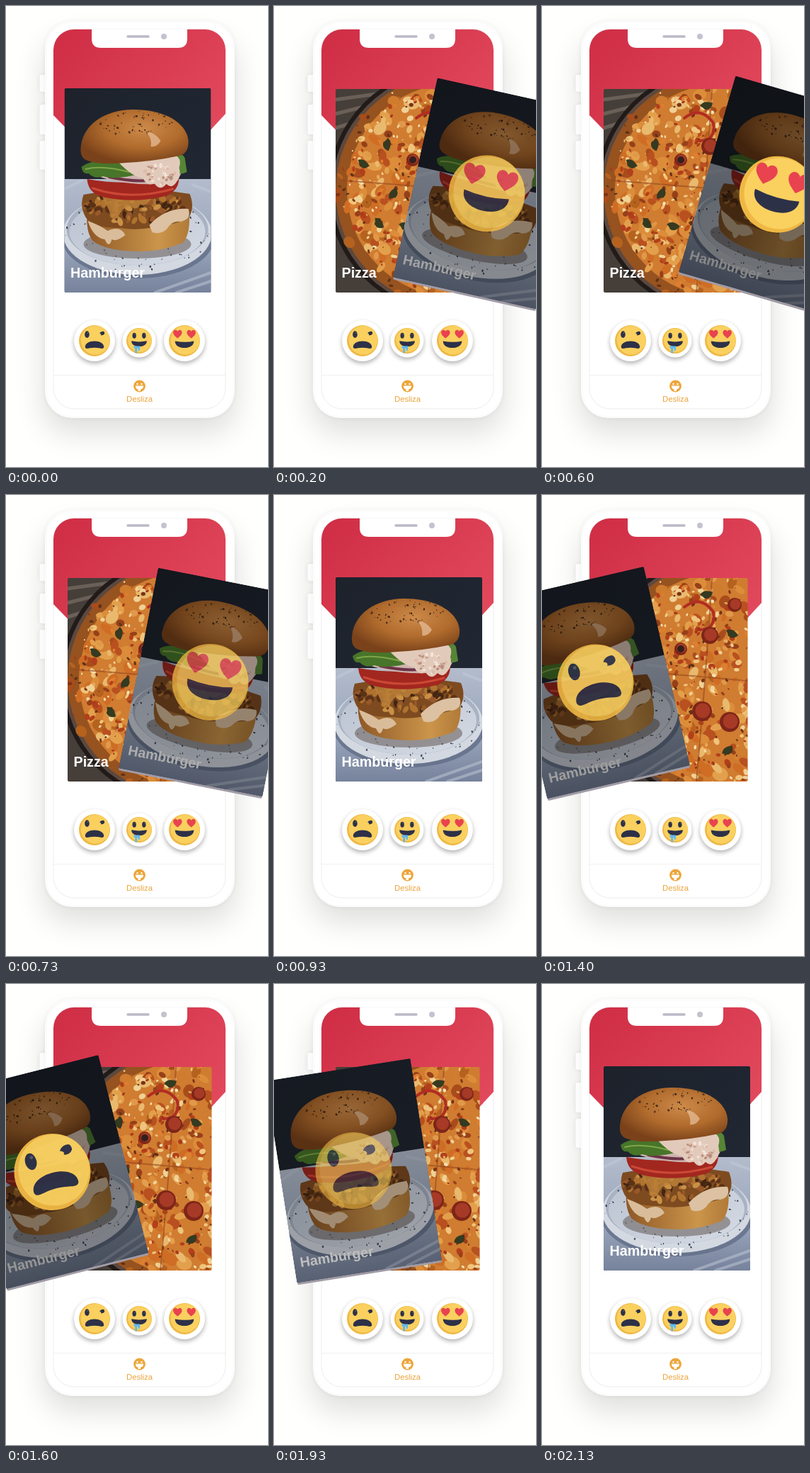
An HTML page for the animation above (3.99 s loop, 370 by 650 pixels).

```html
<!DOCTYPE html>
<html lang="es">
<head>
<meta charset="utf-8">
<title>Desliza</title>
<style>
  html, body { margin: 0; width: 100%; height: 100%; overflow: hidden; background: #fffffd; }
  svg { display: block; width: 370px; height: 650px; }
  text { font-family: "Liberation Sans", Arial, sans-serif; }
  .title { font-size: 19.7px; font-weight: 700; fill: #fff; }
</style>
</head>
<body>
<svg id="stage" viewBox="0 0 370 650" xmlns="http://www.w3.org/2000/svg"></svg>
<script>
const LOOP = 3990;
const CENTER = { x: 190.5, y: 260 };

// [start time, horizontal drag]: swipe right, release, swipe left, release
const DRAG = [
  [0, -4.5], [130, 30], [200, 110], [270, 143], [330, 149],
  [600, 142], [670, 128], [730, 98], [800, 55], [870, 18], [930, 0],
  [1200, -12], [1270, -68], [1400, -115], [1470, -122], [1600, -125],
  [1800, -118], [1870, -103], [1930, -78], [2000, -40], [2070, -14], [2130, 0]
];

const ellipse = (x, y, rx, ry, fill, extra = '') =>
  `<ellipse cx="${x}" cy="${y}" rx="${rx}" ry="${ry}" fill="${fill}" ${extra}/>`;
const circle = (x, y, r, fill, extra) => ellipse(x, y, r, r, fill, extra);
const rect = (x, y, w, h, r, fill, extra = '') =>
  `<rect x="${x}" y="${y}" width="${w}" height="${h}" rx="${r}" fill="${fill}" ${extra}/>`;
const path = (d, fill, extra = '') => `<path d="${d}" fill="${fill}" ${extra}/>`;
const line = (d, color, width, extra = '') =>
  path(d, 'none', `stroke="${color}" stroke-width="${width}" stroke-linecap="round" ${extra}`);
const turn = (deg, x, y) => `transform="rotate(${deg} ${x} ${y})"`;

function random(seed) {
  return () => (seed = (seed * 16807) % 2147483647) / 2147483647;
}

// Small ellipses spread evenly over a disc or an oval
function scatter(seed, count, area, size, colors) {
  const rnd = random(seed);
  let out = '';
  for (let i = 0; i < count; i++) {
    const a = rnd() * Math.PI * 2, d = Math.sqrt(rnd());
    const x = (area.x + area.rx * d * Math.cos(a)).toFixed(1);
    const y = (area.y + area.ry * d * Math.sin(a)).toFixed(1);
    const r = size * (0.5 + rnd());
    const color = colors[Math.floor(rnd() * colors.length)];
    out += ellipse(x, y, r.toFixed(1), (r * (0.45 + rnd() * 0.4)).toFixed(1), color,
      turn(Math.round(rnd() * 180), x, y));
  }
  return out;
}

const defs = `<defs>
  <linearGradient id="red" x1="0" y1=".2" x2="1" y2=".8">
    <stop offset="0" stop-color="#d02f46"/><stop offset="1" stop-color="#e2495d"/></linearGradient>
  <linearGradient id="cloth" x1="0" y1="0" x2="0" y2="1">
    <stop offset="0" stop-color="#b3bccc"/><stop offset=".6" stop-color="#98a4ba"/>
    <stop offset="1" stop-color="#77839c"/></linearGradient>
  <linearGradient id="wall" x1="0" y1="0" x2="1" y2="1">
    <stop offset="0" stop-color="#1d222b"/><stop offset="1" stop-color="#222936"/></linearGradient>
  <linearGradient id="plate" x1="0" y1="0" x2="1" y2="1">
    <stop offset="0" stop-color="#b9c2d0"/><stop offset="1" stop-color="#d6dbe4"/></linearGradient>
  <radialGradient id="bun" cx=".58" cy=".35" r=".65">
    <stop offset="0" stop-color="#cd8a49"/><stop offset=".55" stop-color="#b06b2d"/>
    <stop offset="1" stop-color="#7a421a"/></radialGradient>
  <linearGradient id="base" x1="0" y1="0" x2="1" y2="0">
    <stop offset="0" stop-color="#8f5826"/><stop offset=".7" stop-color="#cb954b"/>
    <stop offset="1" stop-color="#b07a38"/></linearGradient>
  <filter id="soft" x="-40%" y="-40%" width="180%" height="180%"><feGaussianBlur stdDeviation="20"/></filter>
  <filter id="near" x="-40%" y="-40%" width="180%" height="180%"><feGaussianBlur stdDeviation="3.2"/></filter>
  <filter id="photo"><feGaussianBlur stdDeviation=".7"/></filter>
  <clipPath id="screen">${rect(67, 33, 243, 535, 29, '#000')}</clipPath>
  <clipPath id="card">${rect(87, 116, 207, 288, 2, '#000')}</clipPath>
  <clipPath id="below">${rect(87, 117, 203.5, 287, 2, '#000')}</clipPath>
</defs>`;

// Faces are drawn around 0,0 with a radius of 50
const INK = '#2d3148';
const head = circle(0, 0, 50, '#efb844') + circle(2.5, -2, 46.5, '#fad05f');
const heart = x => path('M0 14C-9 7-15 1-14-6C-13-14-3-15 0-8C3-15 13-14 14-6C15 1 9 7 0 14Z',
  '#e8434f', `transform="translate(${x} -22)"`);
const grin = path('M-30 1Q0 7 30 1C31 15 17 23 0 23S-31 15-30 1Z', INK);
const openEye = x => ellipse(x, -20, 7.5, 11, INK) + circle(x + 2, -25, 2.2, '#565b70');

const faces = {
  love: head + heart(-22) + heart(22) + grin,
  drool: head + openEye(-19) + openEye(19) + grin +
    path('M-22 21H3V35Q3 40 0 40T-4 35V31Q-6 28-8 31V44Q-8 50-12 50T-16 44V32Q-22 30-22 21Z', '#5fb9f1'),
  nope: head + openEye(-24) +
    path('M16-24Q20-31 29-30Q33-28 32-22Q28-16 20-18Q23-22 16-24Z', INK) +
    path('M-30 21C-31 8-16 1 0 1S31 8 30 21C27 29 18 22 0 22S-27 29-30 21Z', INK)
};
const face = (name, x, y, r) =>
  `<g transform="translate(${x} ${y}) scale(${r / 50})">${faces[name]}</g>`;
const button = (name, x, r, inner) =>
  circle(x, 475, r, '#000', 'opacity=".3" filter="url(#near)"') +
  circle(x, 472, r, '#fff') + face(name, x, 472, inner);

function phone() {
  const keys = [[97, 24], [139, 42], [190, 41]].map(([y, h]) =>
    rect(47.5, y, 14, h, 3, '#000', 'opacity=".08" filter="url(#near)"') +
    rect(47.5, y, 14, h, 3, '#fdfdfd')).join('');
  return rect(52, 46, 274, 557, 40, '#000', 'opacity=".12" filter="url(#soft)"') + keys +
    rect(55, 22, 268, 559, 38, '#000', 'opacity=".06" filter="url(#near)"') +
    rect(55, 21, 268, 560, 38, '#fcfcfc') +
    rect(58, 24, 262, 554, 35, '#fff') +
    rect(67, 33, 243, 535, 29, '#fff', 'stroke="#ededed"') +
    `<g clip-path="url(#screen)">
      ${path('M67 33H310V152L274 191H103L67 154Z', 'url(#red)')}
      ${path('M121 32V46Q121 59 134 59H243Q256 59 256 46V32Z', '#fff')}
      ${line('M67 520.5H310', '#f0f0f0', 1)}
    </g>` +
    line('M172 43H201', '#bbb9c7', 3.4) + circle(223, 43, 4, '#c4c2cf') +
    button('nope', 125, 29, 22) + button('drool', 188, 23.5, 18) + button('love', 252, 29, 22) +
    circle(188.5, 536, 8.4, '#eda63b') +
    circle(185.5, 533, 1.2, '#fff') + circle(191.5, 533, 1.2, '#fff') +
    path('M183 535.5H194Q194 540 190 540.5V543H186.5V540.5Q183 540 183 535.5Z', '#fff') +
    '<text x="188.5" y="558" font-size="11.3" text-anchor="middle" fill="#eba43c">Desliza</text>';
}

function pizza() {
  const disc = { x: 251, y: 260, rx: 149, ry: 149 };
  const whole = { x: 251, y: 260, rx: 163, ry: 163 };
  const leaf = (x, y, a) => path('M-9 1Q-4-8 9-3Q7 7-2 6Q-4 3-9 1Z', '#353a20',
    `transform="translate(${x} ${y}) rotate(${a})"`);
  const salami = (x, y, r) => circle(x, y, r, '#7d2518') + circle(x + 1, y - 1, r * 0.75, '#a63a26');
  return `<g clip-path="url(#below)"><g filter="url(#photo)">
    ${rect(87, 116, 207, 288, 0, '#453e39')}
    ${line('M87 132L160 122M87 152L135 140M87 172L110 165', '#6b6058', 5)}
    ${circle(251, 260, 175, '#211b19')}
    ${circle(251, 260, 169, '#5b483f')}
    ${circle(251, 260, 164, '#96521f')}
    ${circle(253, 260, 150, '#d07c31')}
    ${scatter(77, 90, whole, 7, ['#b5621f', '#cf7c2f', '#a84c1c'])}
    ${scatter(11, 190, disc, 8, ['#e3a04c', '#e9b96e', '#cf6d25', '#dc8d3a', '#b9501f'])}
    ${scatter(29, 300, disc, 4, ['#f0d195', '#b23f1b', '#e0994a', '#96401a', '#dd7f30', '#efc47c'])}
    ${scatter(83, 300, whole, 2.2, ['#7a3414', '#f5dfb0', '#a8381a', '#e5aa5c', '#5f3218'])}
    ${line('M97 246Q180 252 290 262M240 117Q232 250 218 404', '#95481f', 2, 'opacity=".6"')}
    ${line('M201 158Q224 140 242 165Q246 190 222 190', '#b22c22', 4)}
    ${salami(196, 217, 9)}${circle(196, 217, 5, '#33201d')}
    ${salami(237, 198, 12)}${salami(265, 320, 14)}${salami(226, 305, 14)}${salami(272, 155, 10)}
    ${leaf(232, 140, 0)}${leaf(148, 306, 60)}${leaf(168, 265, -50)}${leaf(262, 360, -25)}
    ${leaf(185, 310, 20)}${leaf(268, 195, 35)}${leaf(160, 195, 100)}${leaf(126, 222, 40)}
    </g><text class="title" x="95.5" y="383">Pizza</text>
  </g>`;
}

function burger() {
  return `<g clip-path="url(#card)">
    ${rect(87, 116, 207, 288, 0, 'url(#wall)')}
    ${rect(87, 244, 207, 160, 0, 'url(#cloth)')}
    ${line('M87 258L112 246M268 252L294 262M215 404L294 376M245 404L294 388', '#c3cbd9', 4, 'opacity=".5"')}
    ${ellipse(191, 328, 107, 56, '#5f6b84', 'opacity=".75"')}
    ${ellipse(190, 321, 105, 58, '#d3d8e1')}
    ${ellipse(190, 315, 100, 51, '#a8b2c3')}
    ${ellipse(190, 318, 96, 48, 'url(#plate)')}
    ${scatter(53, 110, { x: 190, y: 321, rx: 102, ry: 55 }, 1.2, ['#2e3542', '#4c5566'])}
    ${ellipse(190, 336, 76, 20, '#6d6463', 'opacity=".6"')}
    ${path('M119 290Q190 305 263 286Q266 322 254 334Q222 347 190 346Q144 345 127 331Q117 319 119 290Z', 'url(#base)')}
    ${path('M114 266Q190 252 264 265Q271 282 264 296Q248 308 228 308Q196 318 166 313Q130 314 117 298Q108 282 114 266Z', '#7e4b20')}
    ${scatter(41, 110, { x: 188, y: 284, rx: 72, ry: 23 }, 4.5, ['#b0732f', '#5c3216', '#98592a', '#c99046', '#432613'])}
    ${path('M140 268Q186 258 210 271Q203 283 194 280Q188 290 181 282Q168 284 163 297Q156 307 150 288Z', '#bd8139', 'opacity=".85"')}
    ${path('M207 309Q230 284 262 286Q267 300 252 304Q239 302 232 314Q223 323 211 319Z', '#dcc1a2')}
    ${path('M120 303Q137 309 148 317Q166 309 173 323Q160 333 154 329Q150 343 144 329Q128 327 120 303Z', '#d9bd9b')}
    ${path('M119 244Q182 255 249 241Q249 261 230 268Q184 279 140 269Q120 263 119 244Z', '#a2271f')}
    ${line('M127 257Q180 275 240 258', '#cb4835', 3)}
    ${path('M120 234Q190 231 252 235Q250 249 214 251Q160 253 120 234Z', '#cdb4ae')}
    ${line('M150 241Q180 248 207 246', '#6d3348', 4)}
    ${path('M111 227Q126 215 161 219L196 236Q158 246 142 240Q130 245 121 236Q113 238 111 227Z', '#477529')}
    ${line('M117 230Q140 224 178 234', '#7fa548', 2)}
    ${path('M235 214Q252 204 257 214L260 234Q250 239 239 234Z', '#568536')}
    ${path('M163 220Q212 213 240 209Q254 213 249 228Q252 240 246 247Q239 259 231 251Q222 262 214 250Q204 255 198 243Q183 241 163 220Z', '#e2cabb')}
    ${scatter(67, 36, { x: 222, y: 236, rx: 23, ry: 16 }, 2.4, ['#f3e4d8', '#b98d7b', '#ddbaa8'])}
    ${path('M110 202C111 168 144 146 184 146C229 146 260 165 262 190Q263 207 250 211Q213 219 174 221Q135 225 117 217Q109 212 110 202Z', 'url(#bun)')}
    ${scatter(19, 54, { x: 189, y: 166, rx: 52, ry: 18 }, 1.2, ['#3a2415', '#54331a'])}
    ${path('M203 178Q214 177 223 190Q217 200 209 198Q211 187 203 178Z', '#e6bd97', 'opacity=".75"')}
    <text class="title" x="95.5" y="383">Hamburger</text>
    ${rect(87, 116, 207, 288, 0, '#000', 'id="shade"')}
  </g>`;
}

const stage = document.getElementById('stage');
stage.innerHTML = defs + phone() + `<g id="next">${pizza()}</g><g id="top">
  ${rect(87.5, 119, 206, 288, 2, '#a19ba5', 'id="edge"')}${burger()}
  <g id="love">${face('love', CENTER.x, CENTER.y, 54)}</g>
  <g id="nope">${face('nope', CENTER.x, CENTER.y, 54)}</g></g>`;

const part = Object.fromEntries(['next', 'top', 'edge', 'shade', 'love', 'nope']
  .map(id => [id, document.getElementById(id)]));
const fade = (node, value) => node.setAttribute('opacity', Math.max(0, Math.min(1, value)).toFixed(3));

function draw(time) {
  const dx = DRAG.findLast(([start]) => start <= time)[1];
  const pull = Math.abs(dx) < 6 ? 0 : dx;
  const reach = Math.abs(pull);
  part.top.setAttribute('transform',
    `translate(${dx} ${reach * 0.04}) rotate(${pull * 0.114} ${CENTER.x} ${CENTER.y})`);
  fade(part.next, pull ? 1 : 0);
  fade(part.edge, pull ? 1 : 0);
  fade(part.shade, reach * 0.0033);
  fade(part.love, pull / 130);
  fade(part.nope, -pull / 130);
}

const begin = performance.now();
function tick() {
  draw((performance.now() - begin) % LOOP);
  requestAnimationFrame(tick);
}
tick();
</script>
</body>
</html>
```
